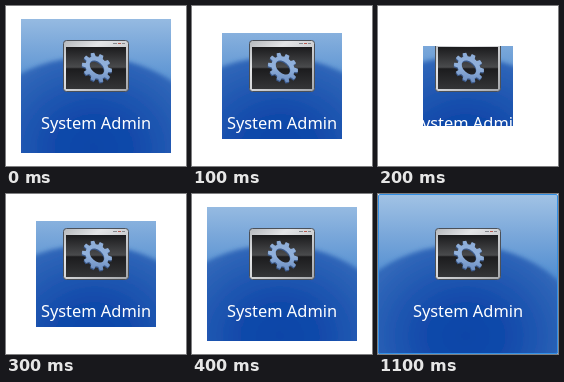
An HTML page for the animation above (1.5 s loop, 180 by 160 pixels).

```html
<!DOCTYPE html>
<html lang="en">
<head>
<meta charset="utf-8">
<title>System Admin tile</title>
<style>
  html, body { margin: 0; width: 100%; height: 100%; overflow: hidden; background: #fff; }
  svg { display: block; width: 180px; height: 160px; border-radius: 2px; }
  text { font: 16.4px "Noto Sans", "Open Sans", sans-serif; fill: #fff; }
</style>
</head>
<body>
<svg id="tile" viewBox="0 0 180 160">
  <defs>
    <linearGradient id="sky" x2="0" y2="1">
      <stop offset="0" stop-color="#a2c3e5"/>
      <stop offset=".25" stop-color="#7ba8da"/>
      <stop offset=".5" stop-color="#5590d2"/>
      <stop offset=".7" stop-color="#3f7fcb"/>
    </linearGradient>
    <radialGradient id="hill" gradientUnits="userSpaceOnUse" cx="88" cy="142" r="128"
                    gradientTransform="translate(0 21) scale(1 .85)">
      <stop offset="0" stop-color="#0e45a8"/>
      <stop offset=".3" stop-color="#1149aa"/>
      <stop offset=".6" stop-color="#2259b2"/>
      <stop offset="1" stop-color="#3a70bd"/>
    </radialGradient>
    <linearGradient id="frame" x2="1" y2="1">
      <stop offset="0" stop-color="#b4b7bb"/>
      <stop offset=".3" stop-color="#e4e5e7"/>
      <stop offset="1" stop-color="#a4a7ab"/>
    </linearGradient>
    <linearGradient id="screen" x2="0" y2="1">
      <stop offset="0" stop-color="#1b1b1d"/>
      <stop offset=".48" stop-color="#4a4b4d"/>
      <stop offset=".52" stop-color="#1c1c1e"/>
      <stop offset="1" stop-color="#343537"/>
    </linearGradient>
    <linearGradient id="steel" x2="1" y2="1">
      <stop offset="0" stop-color="#8cabd6"/>
      <stop offset=".5" stop-color="#91b1dc"/>
      <stop offset="1" stop-color="#5d80b7"/>
    </linearGradient>
    <filter id="soft"><feGaussianBlur stdDeviation="2"/></filter>
  </defs>

  <rect width="180" height="160" fill="url(#sky)"/>
  <ellipse cx="84" cy="160" rx="130" ry="109" fill="url(#hill)" filter="url(#soft)"/>
  <rect x=".5" y=".5" width="179" height="159" rx="1.5" fill="none" stroke="#3390e6"/>

  <rect x="57.5" y="34.5" width="65" height="51" rx="3" fill="url(#frame)" stroke="#4b5058"/>
  <path d="M107 37.5h4m5 0h3" stroke="#85898e"/>
  <path d="M112 37.5h3" stroke="#b65c52"/>
  <rect x="60" y="41" width="60" height="42" fill="url(#screen)"/>
  <g transform="translate(91 61.5) rotate(42) scale(1.06 .86)" fill-rule="evenodd">
    <path class="gear" transform="translate(.5 1.4)" fill="#3c5a8b"/>
    <path class="gear" fill="url(#steel)"/>
  </g>

  <text x="90" y="123" text-anchor="middle">System Admin</text>
</svg>
<script>
  const tile = document.getElementById("tile");
  const STEP = 100, LOOP = 1500;
  const insetLevels = [1, 2, 3, 2, 1, 0];

  function gearPath(teeth, root, tip, holeX, holeY) {
    const pitch = 2 * Math.PI / teeth;
    const profile = [[-.32, root], [-.2, tip], [.2, tip], [.32, root]];
    const points = [];
    for (let i = 0; i < teeth; i++) {
      for (const [offset, radius] of profile) {
        const angle = (i + offset) * pitch;
        points.push(`${radius * Math.cos(angle)},${radius * Math.sin(angle)}`);
      }
    }
    const half = `A${holeX},${holeY} 0 1 0 `;
    return `M${points.join("L")}Z M${holeX},0${half}${-holeX},0${half}${holeX},0Z`;
  }

  const gear = gearPath(10, 11.8, 15.4, 8, 6.4);
  document.querySelectorAll(".gear").forEach(path => path.setAttribute("d", gear));

  function draw(now) {
    const step = Math.min(Math.floor(now % LOOP / STEP), insetLevels.length - 1);
    const level = insetLevels[step];
    tile.style.clipPath = `inset(${Math.round(level * 40 / 3)}px ${level * 15}px)`;
  }

  const start = performance.now();
  function tick() {
    draw(performance.now() - start);
    requestAnimationFrame(tick);
  }
  tick();
</script>
</body>
</html>
```
